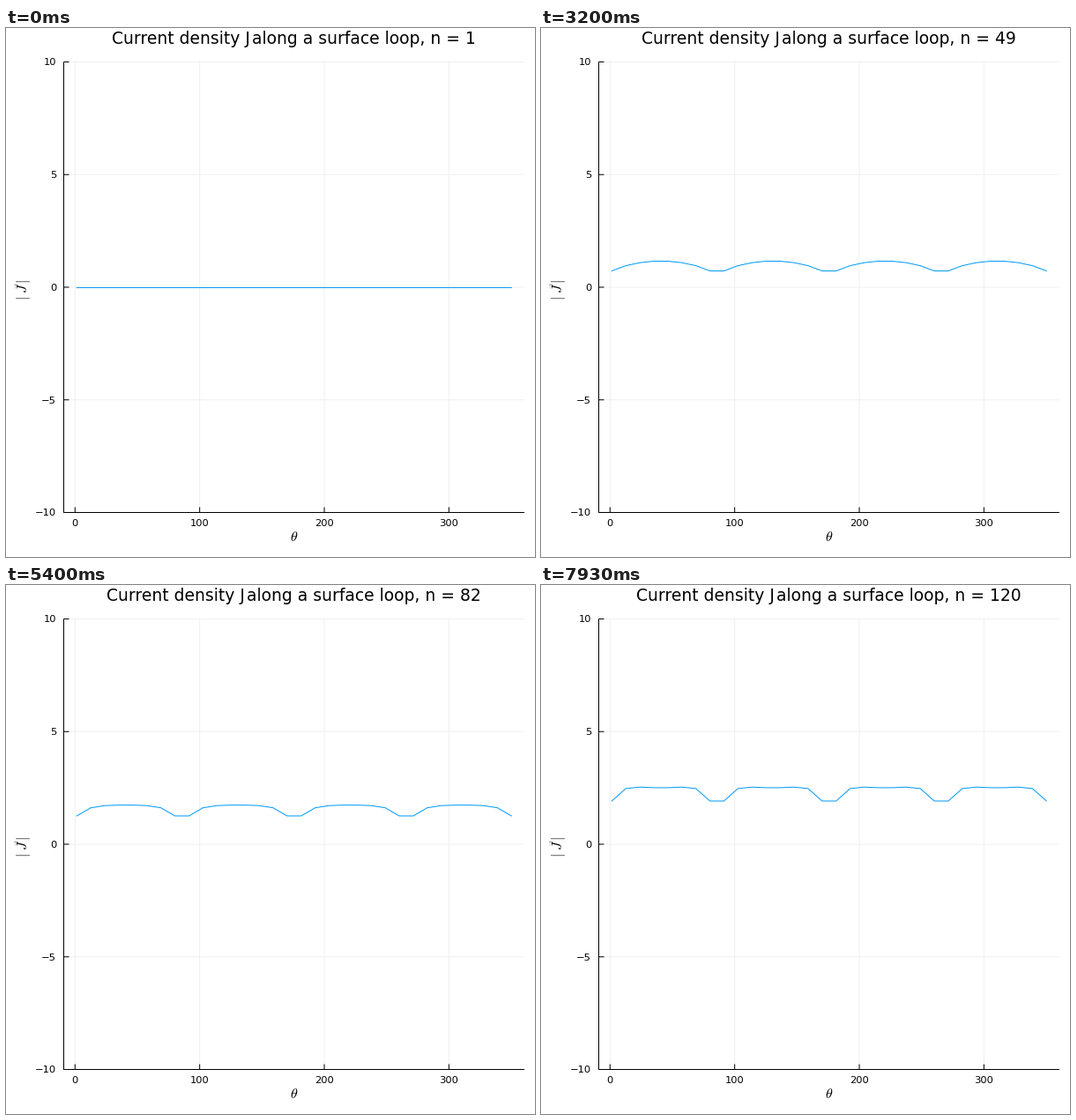
Recreate the animation shown at these times as a matplotlib script. Size 600 by 600 pixels, loop 8000 ms.

```python
import numpy as np
import matplotlib.pyplot as plt
from matplotlib.animation import FuncAnimation

LOOP_MS = 8000
STEP_MS = 20
COUNT = 120
PX = 0.72  # points per pixel at 100 dpi

plt.rcParams["font.family"] = "DejaVu Sans"
plt.rcParams["mathtext.fontset"] = "cm"

LEFT, RIGHT, TOP, BOTTOM = 65.5, 588, 38.5, 549.5

fig = plt.figure(figsize=(6, 6), dpi=100, facecolor="white")
ax = fig.add_axes([0, 0, 1, 1])
ax.set_xlim(0, 600)
ax.set_ylim(600, 0)
ax.axis("off")


def to_x(theta):
    return 78.3 + 1.4136 * theta


def to_y(value):
    return 294 - 25.55 * value


def segment(x, y, color="black", z=3):
    ax.plot(x, y, color=color, lw=PX, zorder=z, solid_capstyle="butt", snap=False)


def label(x, y, text, size, **kw):
    return ax.text(x, y, text, fontsize=size * PX, color="black", **kw)


def wave(n, peak):
    return np.cos(2 * np.pi * (n - peak) / 47)


THETA = 1.4 + 11.25 * np.arange(32)
PHI = np.pi * (np.arange(32) % 8) / 7  # 0 to pi within each quarter


def density(n):
    """A ramp; after n = 27 the corners lag and each side bulges."""
    ramp = max(0, 0.0335 * (n - 13))
    corner = min(ramp, 0.437 + 0.0154 * (n - 27) + 0.07 * wave(n, 67))
    late = max(0, n - 27)
    onset = min(1, late / 8)
    arch = 0.077 * late ** 0.5 - 0.1 * wave(n, 72) * np.exp(-((n - 50) / 30) ** 2)
    flat = n * (0.0011 + 0.00055 * wave(n, 72))
    bulge = (arch * np.sin(PHI) + flat * np.sin(3 * PHI)
             + 0.25 * flat * np.sin(5 * PHI))
    return corner + onset * bulge


# Grid, ticks and axes
for theta in (0, 100, 200, 300):
    x = to_x(theta)
    segment([x, x], [TOP, BOTTOM], "#f0f0f0", 1)
    segment([x, x], [BOTTOM, BOTTOM - 6])
    label(x, 565.2, str(theta), 11.5, ha="center")
for value in (-10, -5, 0, 5, 10):
    y = to_y(value)
    segment([LEFT, RIGHT], [y, y], "#f0f0f0", 1)
    segment([LEFT, LEFT + 6], [y, y])
    label(57.2, y + 3.8, str(value).replace("-", "\u2212"), 11.5, ha="right")
segment([LEFT, LEFT], [TOP, BOTTOM + 0.5])
segment([LEFT - 0.5, RIGHT], [BOTTOM, BOTTOM])

upright = dict(va="baseline", ha="center", rotation=90, rotation_mode="anchor")
label(326.2, 582, r"$\theta$", 16, ha="center")
label(24.5, 297.2, r"$|\;J\,|$", 16, **upright)
label(13, 293, r"$\rightarrow$", 6, **upright)

head = label(0, 17.8, "Current density J", 18.8)
tail = label(0, 17.8, "", 18.8)
line, = ax.plot([], [], color="#009af9", lw=PX, zorder=4,
                solid_joinstyle="round", snap=False)


def update(frame):
    # The counter turns over on a 10 ms clock, so look slightly ahead
    n = min(COUNT, int((frame * STEP_MS + 14) * COUNT / LOOP_MS) + 1)
    x = 120 - 6 * (len(str(n)) - 1)
    head.set_x(x)
    tail.set_x(x + 159)
    tail.set_text(f"along a surface loop, n = {n}")
    line.set_data(to_x(THETA), to_y(density(n)))
    return head, tail, line


anim = FuncAnimation(fig, update, frames=LOOP_MS // STEP_MS, interval=STEP_MS,
                     repeat=True, repeat_delay=0)
plt.show()
```
